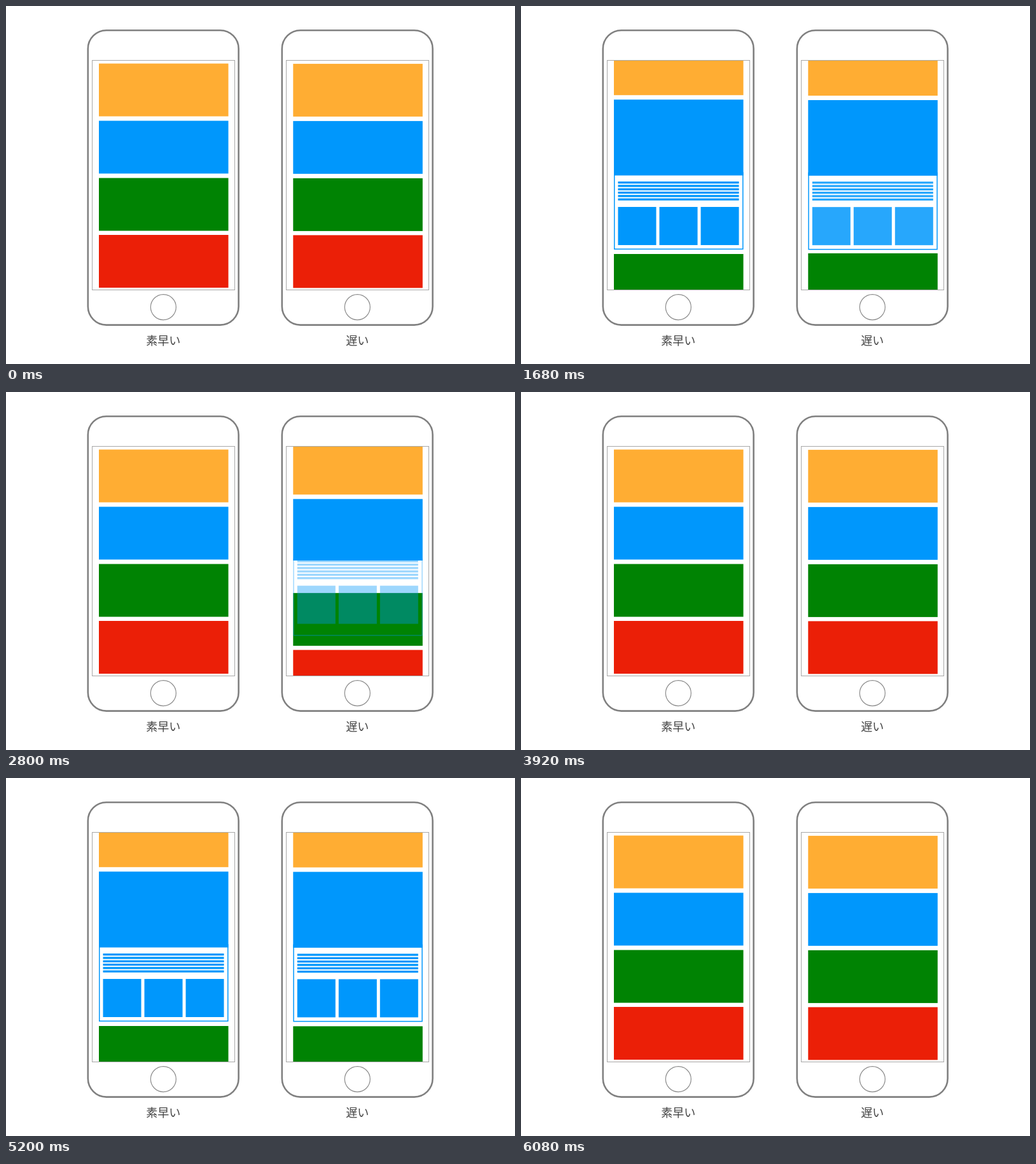
Recreate the animation shown at these times as an HTML page. Size 800x563 px, loop 6.56 s.

```html
<!DOCTYPE html>
<html lang="ja">
<head>
<meta charset="utf-8">
<title>素早い / 遅い</title>
<style>
  html, body { margin: 0; width: 100%; height: 100%; overflow: hidden; background: #fff; }
  svg { display: block; width: 100vw; height: 100vh; }
  text { font: 18px "Noto Sans CJK JP", "Noto Sans CJK", sans-serif; fill: #444; text-anchor: middle; }
</style>
</head>
<body>
<svg id="stage" viewBox="0 0 800 563">
  <defs>
    <clipPath id="screen"><rect x="136" y="86" width="223" height="360"/></clipPath>
  </defs>
</svg>
<script>
const LOOP = 6560, STEP = 40;
const BLUE = '#0097fc';
const RISE = 33.3, DROP = 119.5, GROW = 3, SLIDE = 19;

// Toggle times: each opening is followed by a closing.
const TOGGLES = [
  { at: 996, open: true },
  { at: 2512, open: false },
  { at: 3960, open: true },
  { at: 5264, open: false }
];

const stage = document.getElementById('stage');

function add(parent, tag, attrs) {
  const el = document.createElementNS('http://www.w3.org/2000/svg', tag);
  for (const key in attrs) el.setAttribute(key, attrs[key]);
  return parent.appendChild(el);
}

function box(parent, x, y, width, height, fill) {
  return add(parent, 'rect', { x, y, width, height, fill });
}

const bezier = (a, b, s) => 3 * a * s * (1 - s) ** 2 + 3 * b * s * s * (1 - s) + s ** 3;

// CSS "ease": cubic-bezier(.25, .1, .25, 1)
function ease(x) {
  if (x <= 0) return 0;
  if (x >= 1) return 1;
  let lo = 0, hi = 1;
  for (let i = 0; i < 24; i++) {
    const mid = (lo + hi) / 2;
    if (bezier(.25, .25, mid) < x) lo = mid; else hi = mid;
  }
  return bezier(.1, 1, lo);
}

function makePhone(dx, dy, label, duration) {
  const phone = add(stage, 'g', { transform: `translate(${Math.floor(dx)} 0)` });
  add(phone, 'rect', {
    x: 128.8, y: 38.2, width: 236.8, height: 463.4, rx: 29,
    fill: '#fff', stroke: '#808080', 'stroke-width': 2.6
  });
  add(phone, 'circle', { cx: 247.3, cy: 473.6, r: 20, fill: '#fff', stroke: '#8c8c8c', 'stroke-width': 1.2 });

  const view = add(phone, 'g', { 'clip-path': 'url(#screen)' });
  const page = add(view, 'g', { transform: `translate(${dx % 1} ${dy})` });
  const card = (y, fill) => box(page, 146, y, 203.5, 83, fill);
  const orange = card(90.5, '#ffad33');
  const green = card(270.5, '#008303');
  const red = card(360, '#eb1f07');

  const frame = add(page, 'rect', {
    x: 146.75, y: 262, width: 202, height: 120.3,
    fill: 'none', stroke: BLUE, 'stroke-width': 1.5
  });
  const content = add(page, 'g', {});
  for (let i = 0; i < 6; i++) box(content, 152.5, 276 + i * 5.3, 190, 3.3, BLUE);
  for (let i = 0; i < 3; i++) box(content, 152.5 + i * 65, 316, 60, 60, BLUE);
  const blue = card(180.5, BLUE);

  add(phone, 'rect', {
    x: 135.5, y: 85.5, width: 224, height: 361,
    fill: 'none', stroke: '#a8a8a8', 'stroke-width': 1
  });
  add(phone, 'text', { x: 247.3, y: 533 }).textContent = label;

  const moveY = (el, y) => el.setAttribute('transform', `translate(0 ${y.toFixed(3)})`);

  return time => {
    const last = TOGGLES.filter(s => s.at <= time).pop();
    let size = 0, alpha = 0;
    if (last) {
      const u = (time - last.at) / duration;
      size = last.open ? ease(u) : 1 - ease(u);
      alpha = last.open ? ease((u - .55) / .56) : size;
    }
    moveY(orange, -RISE * size);
    moveY(green, DROP * size);
    moveY(red, DROP * size);
    moveY(content, -SLIDE * (1 - size));
    blue.setAttribute('y', 180.5 - RISE * size);
    blue.setAttribute('height', 83 + (RISE + GROW) * size);
    frame.setAttribute('opacity', size);
    content.setAttribute('opacity', alpha);
  };
}

const phones = [
  makePhone(0, 0, '素早い', 250),
  makePhone(305.3, .4, '遅い', 800)
];

const start = performance.now();

function draw(now) {
  const elapsed = Math.max(0, now - start) % LOOP;
  const time = Math.floor(elapsed / STEP) * STEP;
  phones.forEach(update => update(time));
  requestAnimationFrame(draw);
}
draw(start);
</script>
</body>
</html>
```
